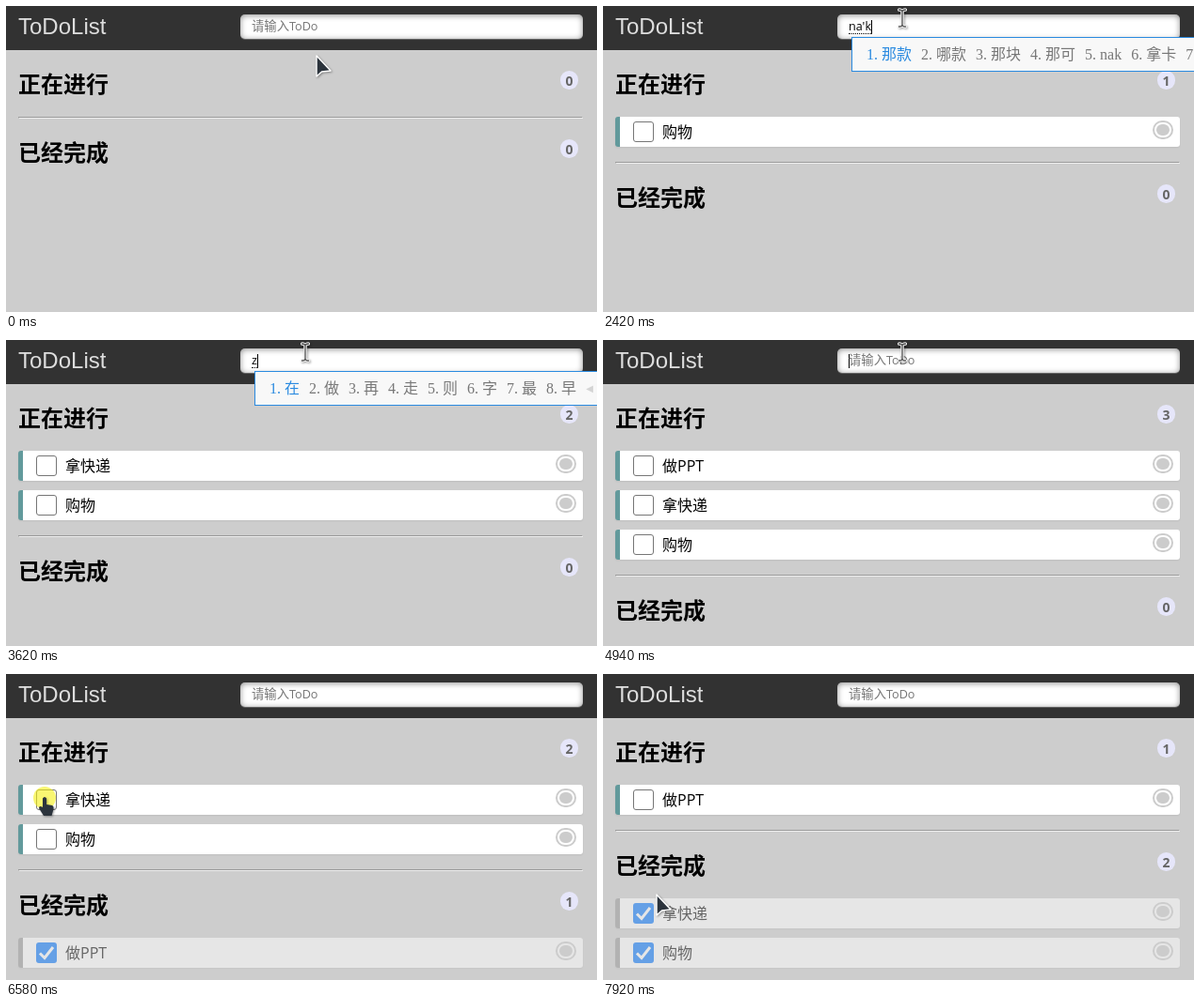
Animation, 628 px wide and 326 px high, one loop 8 s. Source, as an HTML page:

```html
<!DOCTYPE html>
<html lang="zh-CN">
<head>
<meta charset="utf-8">
<title>ToDoList</title>
<style>
* { box-sizing: border-box; margin: 0; padding: 0; }
html, body { width: 100%; height: 100%; overflow: hidden; background: #cdcdcd; }
body { position: relative; font: 16px "Open Sans", "Noto Sans CJK SC", "Noto Sans CJK", sans-serif; color: #000; }
header { position: absolute; inset: 0 0 auto; height: 47px; background: #323232; }
h1 { position: absolute; left: 13px; top: 7px; font: 24px/30px "Liberation Sans", sans-serif; color: #ddd; }

.field { position: absolute; left: 249px; top: 9px; width: 364px; height: 26px; padding-left: 12px;
  display: flex; align-items: center; border-radius: 5px; background: #fff; font-size: 13.333px; white-space: pre;
  box-shadow: 0 1px 0 rgba(255,255,255,.24), inset 0 1px 6px rgba(0,0,0,.45); }
.field span { line-height: 14px; border-bottom: 1px dotted transparent; }
.field i { font-style: normal; font-size: 12.6px; }
.field b { width: 1px; height: 15px; background: #000; visibility: hidden; }
.field.focus b { visibility: visible; }
.field.hint span { color: #757575; }
.field.hint b { order: -1; margin-right: -1px; }
.field.composing span { border-color: #000; }

main { position: absolute; left: 13px; top: 67px; width: 600px; }
h2 { position: relative; height: 32px; margin-bottom: 19px; font-size: 24px; line-height: 32px; }
h2 span { position: absolute; top: 2px; right: 5px; width: 19px; height: 20px; border-radius: 10px;
  background: #e6e6fa; color: #666; font-size: 14px; line-height: 21px; text-align: center; }
ul { list-style: none; }
ul:not(:empty) { padding-bottom: 6px; }
hr { height: 2px; margin-bottom: 20px; border: 1px solid; border-color: #9a9a9a #eee #eee #9a9a9a; }
li { position: relative; height: 32px; margin-bottom: 10px; padding-left: 45px; line-height: 32px; background: #fff;
  border-left: 5px solid #629a9c; border-radius: 3px; box-shadow: 0 1px 2px rgba(0,0,0,.07); }
li .box { position: absolute; left: 14px; top: 5px; width: 22px; height: 22px; border: 1px solid #767676; border-radius: 3px; }
li .remove { position: absolute; top: 2px; right: 5px; width: 26px; height: 24px; border: 6px double #fff;
  border-radius: 14px; background: #ccc; }
li svg { display: none; }
.done li { opacity: .5; border-color: #999; }
.done .box { border: 0; background: #0075ff; }
.done svg { display: block; fill: none; stroke: #fff; stroke-width: 3; }

#ime { position: absolute; left: 264px; top: 33px; width: 400px; height: 37px; padding-left: 15px;
  border: 1px solid #2a8ae0; background: #f8f8f8; color: #777; white-space: nowrap;
  font: 16px/35px "Liberation Serif", "Noto Sans CJK SC", "Noto Sans CJK", serif; }
#ime span { display: inline-block; margin-right: 10px; }
#ime span:first-child { color: #2a8ae0; }
#ime i { display: inline-block; width: 16px; font-style: normal; }
#ime em { color: #d4d4d4; font: 10px "DejaVu Sans", sans-serif; vertical-align: 2px; }

#pointer { position: absolute; left: 0; top: 0; overflow: visible; width: 1px; height: 1px; }
#pointer g { display: none; filter: drop-shadow(1px 1px 1px rgba(0,0,0,.35)); }
#pointer.arrow .arrow, #pointer.beam .beam, #pointer.hand .hand { display: inline; }
#pointer circle { fill: rgba(245,240,20,.6); }
</style>
</head>
<body>
<header>
  <h1>ToDoList</h1>
  <div class="field" id="field"><span></span><b></b></div>
</header>
<main>
  <h2>正在进行<span id="todoCount"></span></h2>
  <ul id="todo"></ul>
  <hr>
  <h2>已经完成<span id="doneCount"></span></h2>
  <ul id="done" class="done"></ul>
</main>
<div id="ime"></div>
<svg id="pointer">
  <circle r="12" cy="1"/>
  <g class="arrow"><path d="M0 0V22L5.5 17 15 16Z" fill="#2b333c" stroke="#fff" stroke-width="1.4" stroke-linejoin="round"/></g>
  <g class="beam" fill="none" stroke-linecap="round">
    <path id="beam" d="M-3.5 -9Q0 -9 0 -6.5Q0 -9 3.5 -9M0 -7V7M-3.5 9Q0 9 0 6.5Q0 9 3.5 9" stroke="#eee" stroke-width="3"/>
    <use href="#beam" style="stroke:#555;stroke-width:1.3"/>
    <path d="M-3.5 -9Q0 -9 0 -6.5Q0 -9 3.5 -9M0 -7V7M-3.5 9Q0 9 0 6.5Q0 9 3.5 9" stroke="#555" stroke-width="1.3"/>
  </g>
  <g class="hand"><path d="M-2 1.5Q0 -1.5 2 1.5V8L8 9Q10 10 9.5 13L7.5 20H-1L-6 12Q-6 8.500 -2 11Z" fill="#2b333c"/></g>
</svg>
<script>
const LOOP = 8000;
const $ = id => document.getElementById(id);

const at = (shape, x, y) => ({ shape, x, y, press: false });
const press = { press: true };
const compose = (text, words) => ({ text, words, composing: true });
const commit = text => ({ text, words: '', composing: false });
const lists = (todo, done = '') => ({ text: '', todo, done });

const A = '购物', B = '拿快递', C = '做PPT';

const script = [
  [0, { ...at('arrow', 330, 53), ...commit(''), ...lists(''), focus: false }],
  [100, at('arrow', 325, 40)],
  [220, at('beam', 318, 13)],
  [340, press],
  [460, { press: false, focus: true }],

  [770, compose('g', '个 给 该 过 跟 高 更 改')],
  [990, compose('go', '够 购 狗 勾 沟 钩 构 苟')],
  [1100, compose('gou', '够 购 狗 勾 沟 钩 构 苟')],
  [1210, compose("gou'w", '购物 够玩 够我 狗窝 够味 勾玩 构')],
  [1440, commit(A)],
  [1760, lists(A)],

  [2210, compose('n', '你 年 那 呢 能 拿 哪 女')],
  [2310, compose('na', '那 拿 哪 呐 纳 娜 钠 捺')],
  [2420, compose("na'k", '那款 哪款 那块 那可 nak 拿卡 那颗')],
  [2530, compose("na'ku", '那库 哪库 拿库 那苦 那哭 纳库 那裤')],
  [2640, compose("na'kua", '那夸 哪夸 那跨 拿夸 那垮 那 拿')],
  [2750, compose("na'kuai", '那块 哪块 拿快 那快 纳快 那 拿')],
  [2860, compose("na'kuai'd", '拿快递 那块地 那块的 那快点 哪块地 那块')],
  [3080, commit(B)],
  [3290, lists(`${B} ${A}`)],

  [3620, compose('z', '在 做 再 走 则 字 最 早')],
  [3730, compose('zu', '组 族 足 租 祖 阻 卒 俎')],
  [3840, compose('zuo', '做 作 坐 左 座 昨 佐 琢')],
  [4060, commit('做')],
  [4390, commit('做P')],
  [4500, commit('做PP')],
  [4610, commit(C)],
  [4940, lists(`${C} ${B} ${A}`)],

  [5490, at('beam', 285, 27)],
  [5600, at('arrow', 215, 62)],
  [5710, at('arrow', 150, 90)],
  [5820, at('arrow', 95, 112)],
  [5930, at('arrow', 60, 127)],
  [6040, at('hand', 41, 131)],
  [6150, { ...press, focus: false }],
  [6250, { press: false, ...lists(`${B} ${A}`, C) }],
  [6480, press],
  [6590, { press: false, ...lists(A, `${C} ${B}`) }],
  [6700, at('hand', 42, 131)],
  [6810, press],
  [6920, { press: false, ...lists('', `${C} ${B} ${A}`) }],
  [7030, at('arrow', 43, 131)],
  [7140, at('arrow', 51, 132)],
  [7260, at('arrow', 48, 170)],
  [7360, at('hand', 43, 206)],
  [7470, press],
  [7580, { ...at('arrow', 43, 206), ...lists(C, `${B} ${A}`) }],
  [7690, at('arrow', 48, 215)],
  [7810, at('arrow', 54, 228)],
  [7920, at('arrow', 57, 235)],
];

let merged = {};
const states = script.map(([time, change]) => ({ time, ...(merged = { ...merged, ...change }) }));

function drawList(id, text) {
  const items = text ? text.split(' ') : [];
  $(id + 'Count').textContent = items.length;
  $(id).innerHTML = items.map(item => `<li><div class="box"><svg width="22" height="22">
    <path d="M4 11.500L9 16.500 18 5"/></svg></div>${item}<div class="remove"></div></li>`).join('');
}

function draw(s) {
  const field = $('field');
  field.classList.toggle('focus', s.focus);
  field.classList.toggle('hint', !s.text);
  field.classList.toggle('composing', s.composing);
  field.firstChild.innerHTML = (s.text || '请输入ToDo').replace(/[a-z']+/gi, '<i>$&</i>');

  $('ime').hidden = !s.words;
  $('ime').style.display = s.words ? '' : 'none';
  $('ime').innerHTML = s.words.split(' ').map((w, i) => `<span><i>${i + 1}.</i>${w}</span>`).join('') + '<em>◀</em>';

  drawList('todo', s.todo);
  drawList('done', s.done);

  const pointer = $('pointer');
  pointer.setAttribute('class', s.shape);
  pointer.style.transform = `translate(${s.x}px, ${s.y}px)`;
  pointer.querySelector('circle').style.display = s.press ? '' : 'none';
}

const start = performance.now();
let shown;
function tick() {
  const time = (performance.now() - start) % LOOP;
  const state = states.findLast(s => s.time <= time);
  if (state !== shown) draw(shown = state);
  requestAnimationFrame(tick);
}
tick();
</script>
</body>
</html>
```
